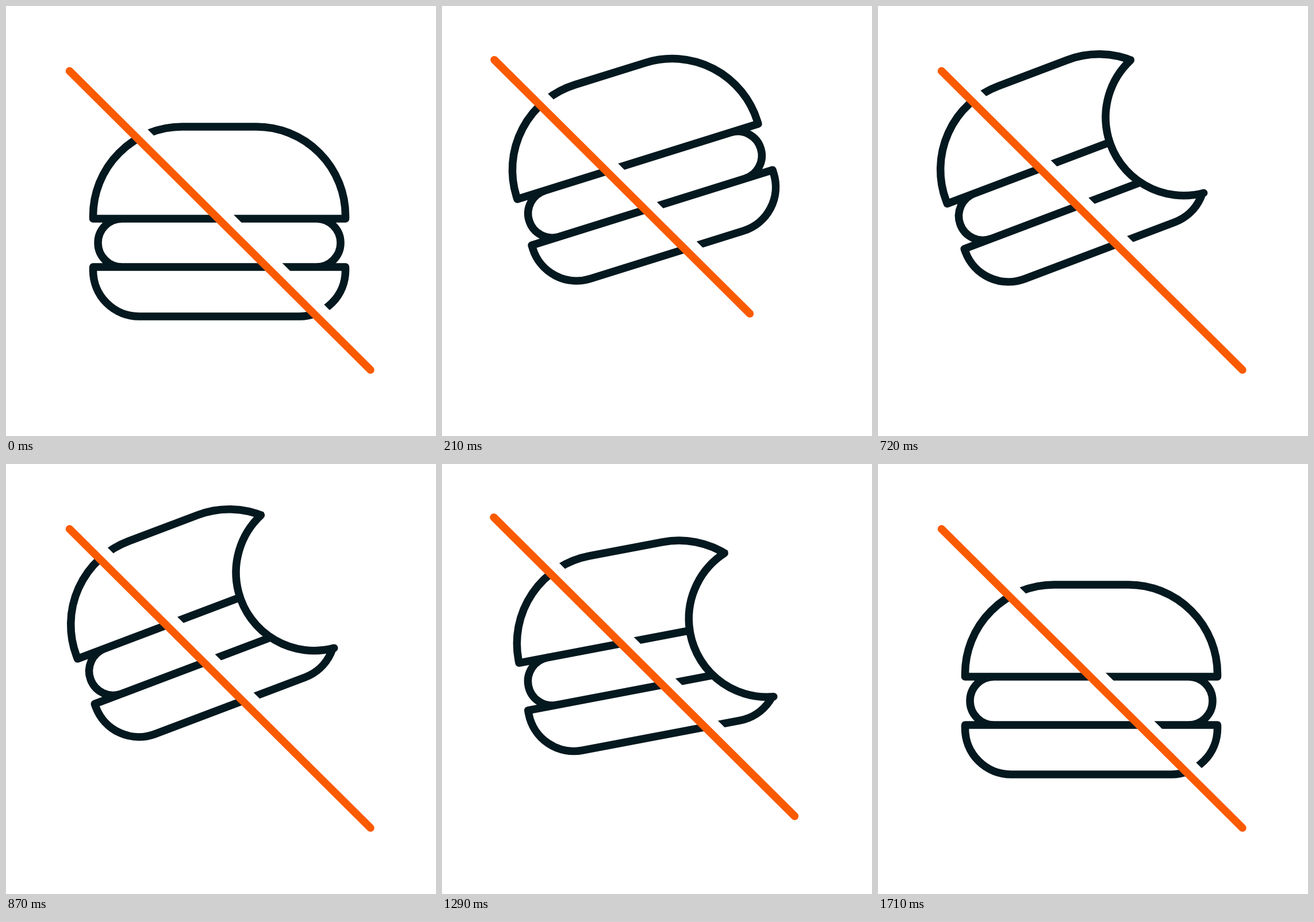
An HTML page with a canvas for the animation above (1.74 s loop, 748 px wide and 748 px high).

```html
<!DOCTYPE html>
<html lang="en">
<head>
<meta charset="utf-8">
<title>No burger</title>
<style>
html, body { margin: 0; width: 100%; height: 100%; overflow: hidden; background: #fff; }
canvas { display: block; }
</style>
</head>
<body>
<canvas id="stage" width="748" height="748"></canvas>
<script>
const ctx = document.getElementById('stage').getContext('2d');
const LOOP = 1740, STEP = 30, SECOND_SWING = 900;
const BITE_ON = 270, BITE_OFF = 1410;
const DARK = '#04181f', ORANGE = '#fa5a00';

// [time, tilt in degrees, x shift, y shift]
const burgerKeys = [
  [0, 0, 0, 0], [105, 9.4, -17, -56], [210, 17.36, -29, -99.7],
  [330, 20, -36, -109], [510, 20.7, -38, -110], [720, 20.7, -43.5, -104],
  [1080, 20.7, -29.5, -117.5], [1170, 19.3, -27, -110], [1290, 10.75, -20.4, -65],
  [1400, 4.2, -8, -26], [1500, 1.9, -3.5, -11.5], [1620, 0.7, -1.3, -4.2], [1710, 0, 0, 0]
];

// [time, shift of the start, shift of the end]
const slashKeys = [
  [0, 0, 0], [60, -35, -95], [120, -76, -225], [145, -81, -240],
  [180, -61.5, -194.5], [210, -19.5, -98.5], [245, 14, 4], [285, 41.5, 41.5],
  [390, -20.5, -20.5], [500, 10, 10], [540, 5.5, 5.5], [600, 0, 0]
];

// Smooth curve through the keys that never overshoots them.
function sample(keys, t) {
  const last = keys.length - 1;
  if (t >= keys[last][0]) return keys[last].slice(1);
  const i = keys.findIndex(k => k[0] > t) - 1;
  const a = keys[i], b = keys[i + 1], span = b[0] - a[0], u = (t - a[0]) / span;
  return a.slice(1).map((_, n) => {
    const c = n + 1;
    const slope = j => (keys[j + 1][c] - keys[j][c]) / (keys[j + 1][0] - keys[j][0]);
    const tangent = j => {
      if (j === 0 || j === last) return 0;
      const p = slope(j - 1), q = slope(j);
      return p * q <= 0 ? 0 : 2 * p * q / (p + q);
    };
    const h = u * u * (3 - 2 * u);
    return a[c] + (b[c] - a[c]) * h +
      span * u * (1 - u) * (tangent(i) * (1 - u) - tangent(i + 1) * u);
  });
}

const outline = new Path2D(
  'M151.5 370V365A155 155 0 0 1 306.5 210H435.5A155 155 0 0 1 590.5 365V370Z' +
  'M202 370A42 42 0 0 0 202 454M540 370A42 42 0 0 1 540 454' +
  'M151.5 454V460A80 80 0 0 0 231.5 540H510.5A80 80 0 0 0 590.5 460V454Z'
);

function drawBurger(t) {
  const [tilt, x, y] = sample(burgerKeys, t);
  const bitten = t >= BITE_ON && t < BITE_OFF;
  const bite = [589.6, 375, 136];
  ctx.save();
  ctx.translate(371 + x, 375 + y);
  ctx.rotate(-tilt * Math.PI / 180);
  ctx.translate(-371, -375);
  ctx.strokeStyle = DARK;
  ctx.save();
  if (bitten) {
    ctx.beginPath();
    ctx.rect(0, 0, 748, 748);
    ctx.moveTo(bite[0] + bite[2], bite[1]);
    ctx.arc(...bite, 0, 7);
    ctx.clip('evenodd');
  }
  ctx.stroke(outline);
  ctx.restore();
  if (bitten) {
    ctx.beginPath();
    ctx.arc(...bite, 1.674, 4.324);
    ctx.stroke();
  }
  ctx.restore();
}

function drawSlash(t) {
  const [from, to] = sample(slashKeys, t < SECOND_SWING ? t : t - SECOND_SWING);
  const line = (offset, width, color, cap) => {
    const point = x => [x + offset, 113 + (x - 110.5) * 0.9933 - offset];
    ctx.beginPath();
    ctx.moveTo(...point(110.5 + from));
    ctx.lineTo(...point(634 + to));
    ctx.lineWidth = width;
    ctx.strokeStyle = color;
    ctx.lineCap = cap;
    ctx.stroke();
  };
  line(8.4, 23.7, '#fff', 'butt');
  line(0, 13.5, ORANGE, 'round');
}

function frame() {
  const t = Math.floor(performance.now() % LOOP / STEP) * STEP;
  ctx.fillStyle = '#fff';
  ctx.fillRect(0, 0, 748, 748);
  ctx.lineWidth = 13.5;
  ctx.lineCap = ctx.lineJoin = 'round';
  drawBurger(t);
  drawSlash(t);
  requestAnimationFrame(frame);
}
frame();
</script>
</body>
</html>
```
